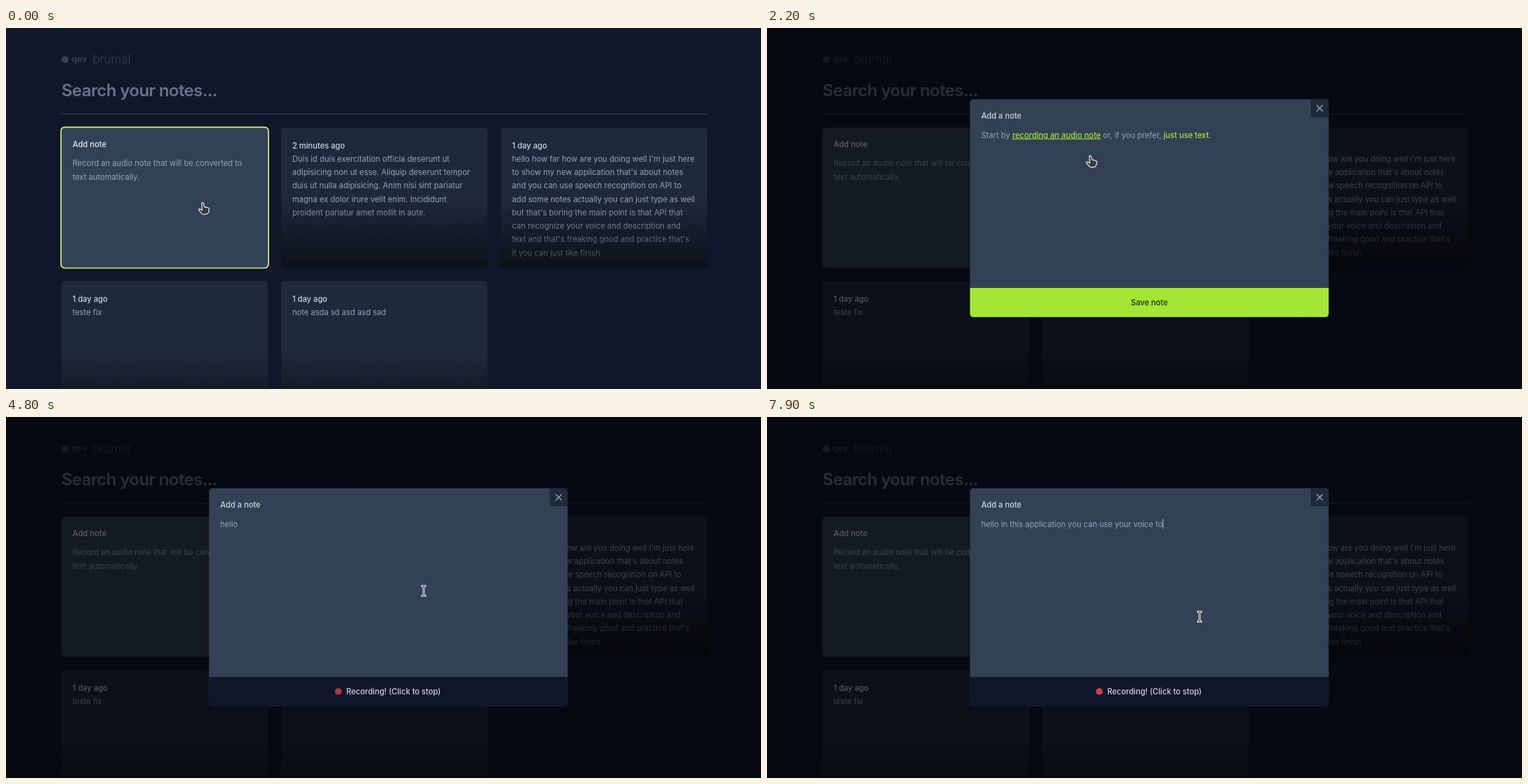
Write an HTML page that moves like this. It is 1081 px wide and 518 px high and loops after 8000 ms.

```html
<!DOCTYPE html>
<html lang="en">
<head>
<meta charset="utf-8">
<title>Notes</title>
<style>
  html, body { margin: 0; width: 100%; height: 100%; overflow: hidden; background: #0f172a; }
  svg { display: block; width: 100%; height: 100%; }
  text { font: 400 11.2px Inter, sans-serif; fill: #94a3b8; }
  .title { font-weight: 500; fill: #cbd5e1; }
  .bright { fill: #e2e8f0; }
  .search { font-size: 24.1px; font-weight: 600; letter-spacing: -.6px; fill: #64748b; }
  .brand { fill: #334155; }
  .link { font-weight: 500; fill: #a3e635; }
  .pointer { fill: #3b3b3f; stroke: #fff; stroke-width: 1.1; stroke-linejoin: round; }
  .beam { fill: none; stroke-linecap: square; }
</style>
</head>
<body>
<svg id="stage" viewBox="0 0 1081 518">
  <defs>
    <linearGradient id="fade" x1="0" y1="0" x2="0" y2="1">
      <stop offset="0" stop-color="#000" stop-opacity="0"/>
      <stop offset="1" stop-color="#000" stop-opacity=".6"/>
    </linearGradient>
    <clipPath id="dialogShape"><rect x="290.7" y="102.2" width="513.5" height="312.6" rx="4.8"/></clipPath>
  </defs>
  <rect width="1081" height="518" fill="#0f172a"/>
  <circle cx="84.6" cy="45.4" r="5" fill="#334155"/>
  <text class="brand" x="94" y="49" style="font-weight:700;font-size:12px">qev</text>
  <text class="brand" x="124" y="50.5" style="font-weight:300;font-size:17px">brumal</text>
  <text class="search" x="79.5" y="98">Search your notes...</text>
  <rect x="79.5" y="123" width="924.5" height=".9" fill="#334155"/>
  <g id="cards"></g>
  <rect id="ring" x="78.7" y="142.3" width="297.1" height="202.2" rx="5.4" fill="none" stroke="#daf58c" stroke-width="1.7"/>

  <g id="modal">
    <rect width="1081" height="518" fill="#000" fill-opacity=".6"/>
    <g clip-path="url(#dialogShape)">
      <rect x="290" y="102" width="515" height="313" fill="#334155"/>
      <rect x="778.5" y="102" width="26" height="25.9" fill="#1e293b"/>
      <path d="M787.2 111l8.2 8.2m0-8.2l-8.2 8.2" stroke="#94a3b8" stroke-width="1.34" stroke-linecap="round"/>
      <rect id="button" x="290" y="373" width="515" height="42"/>
    </g>
    <text class="title" x="306.7" y="130.4">Add a note</text>
    <g id="intro">
      <text x="306.7" y="157.6">Start by <tspan id="recordLink" class="link">recording an audio note</tspan> or, if you prefer, <tspan class="link">just use text</tspan>.</text>
      <text x="547.4" y="397.9" text-anchor="middle" style="font-weight:500;fill:#1a2e05">Save note</text>
    </g>
    <g id="recording">
      <text id="note" x="306.7" y="157.6"></text>
      <rect id="caret" y="146.3" width=".9" height="14" fill="#cbd5e1"/>
      <circle id="dot" cx="475.9" cy="393.9" r="4.8" fill="#ef4444"/>
      <text class="title" x="487.2" y="397.9">Recording! (Click to stop)</text>
    </g>
  </g>

  <g id="cursor">
    <path id="hand" class="pointer" d="M-1.4 .6C-1.2-.8 .8-.8 1.2 .6L2.6 5.6 8 7Q9.6 7.6 9.4 9.4L8.6 13Q8.2 15.4 6 15.9L1.5 16.5Q-.3 16.5-1.6 15L-5.6 10Q-6 8.2-4 8.6L-.6 10.4Z"/>
    <path id="arrow" class="pointer" d="M.5 .4V13.4L3.2 11 5.4 15.4 8 14.2 5.9 9.9 9.4 9.4Z"/>
    <g id="beam" class="beam">
      <path d="M-2-7H2M0-7V7M-2 7H2" stroke="#fff" stroke-width="2.8"/>
      <path d="M-2-7H2M0-7V7M-2 7H2" stroke="#333" stroke-width="1"/>
    </g>
  </g>
</svg>
<script>
const LOOP = 8000, OPEN = 980, HOVER = 1880, RECORD = 2250;
const BLINK = 720, PULSE = 2000, LINE = 19.26;
const $ = id => document.getElementById(id);

function card(column, row, title, lines) {
  const x = 79.5 + column * 314.6, y = 143 + row * 220;
  const adding = !column && !row;
  const titleY = y + (adding ? 28.2 : 29.8), bodyY = y + (adding ? 55.3 : 48.9);
  const body = lines.map((s, i) => `<text x="${x + 15.8}" y="${bodyY + i * LINE}">${s}</text>`).join('');
  const shade = adding ? '' :
    `<path d="M${x} ${y + 100.4}h295.4v95.6q0 4.8-4.8 4.8h-285.8q-4.8 0-4.8-4.8z" fill="url(#fade)"/>`;
  return `<rect x="${x}" y="${y}" width="295.4" height="200.8" rx="4.8" fill="${adding ? '#334155' : '#1e293b'}"/>
    <text class="title${adding ? ' bright' : ''}" x="${x + 15.8}" y="${titleY}">${title}</text>${body}${shade}`;
}

$('cards').innerHTML = [
  card(0, 0, 'Add note', ['Record an audio note that will be converted to', 'text automatically.']),
  card(1, 0, '2 minutes ago', [
    'Duis id duis exercitation officia deserunt ut',
    'adipisicing non ut esse. Aliquip deserunt tempor',
    'duis ut nulla adipisicing. Anim nisi sint pariatur',
    'magna ex dolor irure velit enim. Incididunt',
    'proident pariatur amet mollit in aute.']),
  card(2, 0, '1 day ago', [
    "hello how far how are you doing well I'm just here",
    "to show my new application that's about notes",
    'and you can use speech recognition on API to',
    'add some notes actually you can just type as well',
    "but that's boring the main point is that API that",
    'can recognize your voice and description and',
    "text and that's freaking good and practice that's",
    'it you can just like finish']),
  card(0, 1, '1 day ago', ['teste fix']),
  card(1, 1, '1 day ago', ['note asda sd asd asd sad'])
].join('');

// Recognised speech: time and number of words heard so far
const speech = 'hello in this application you can use your voice to'.split(' ');
const heard = [[RECORD, 0], [3680, 1], [4890, 3], [5290, 4], [5890, 6], [6290, 8], [6790, 9], [7190, 10]];

// Pointer hotspot: time, x, y
const path = [
  [0, 281.5, 251], [400, 212.5, 226], [1000, 212.5, 226], [1800, 432, 140], [1900, 440, 154.5],
  [2150, 440, 154.5], [2400, 652, 423], [2800, 652, 423], [2900, 600, 283],
  [3700, 598, 249.7], [7300, 598, 249.7], [7850, 619.3, 286.5], [LOOP, 619.3, 286.5]
];

const smooth = u => u * u * (3 - 2 * u);
const show = (id, on) => $(id).style.display = on ? '' : 'none';

function pointerAt(t) {
  const i = path.findIndex(p => p[0] > t);
  const [t0, x0, y0] = path[i - 1], [t1, x1, y1] = path[i];
  const u = smooth((t - t0) / (t1 - t0));
  return [x0 + (x1 - x0) * u, y0 + (y1 - y0) * u];
}

function pointerKind(t, y) {
  if (t < OPEN) return 'hand';
  if (t < RECORD) return t >= HOVER ? 'hand' : 'arrow';
  return y < 373 ? 'beam' : y < 415 ? 'hand' : 'arrow';
}

function drawRecording(t) {
  const [since, count] = heard.filter(h => h[0] <= t).pop();
  $('note').textContent = speech.slice(0, count).join(' ');
  $('caret').setAttribute('x', 306.7 + (count ? $('note').getComputedTextLength() : 0));
  show('caret', Math.floor((t - since) / BLINK) % 2 === 0);
  const clock = t > 2400 && t < 2890 ? 2400 : t;
  const phase = (clock - RECORD) % PULSE / PULSE;
  $('dot').setAttribute('opacity', 1 - smooth(1 - Math.abs(1 - 2 * phase)) / 2);
}

function draw(t) {
  const open = t >= OPEN, recording = t >= RECORD;
  show('ring', !open);
  show('modal', open);
  show('intro', !recording);
  show('recording', recording);
  $('button').setAttribute('fill', recording ? '#0f172a' : '#a3e635');
  $('recordLink').style.textDecoration = t >= HOVER ? 'underline' : 'none';
  if (recording) drawRecording(t);

  const [x, y] = pointerAt(t), kind = pointerKind(t, y);
  for (const id of ['hand', 'arrow', 'beam']) show(id, id === kind);
  $('cursor').setAttribute('transform', `translate(${x} ${y})`);
}

const start = performance.now();
function tick(now) {
  draw(Math.max(0, now - start) % LOOP);
  requestAnimationFrame(tick);
}
draw(0);
requestAnimationFrame(tick);
</script>
</body>
</html>
```
